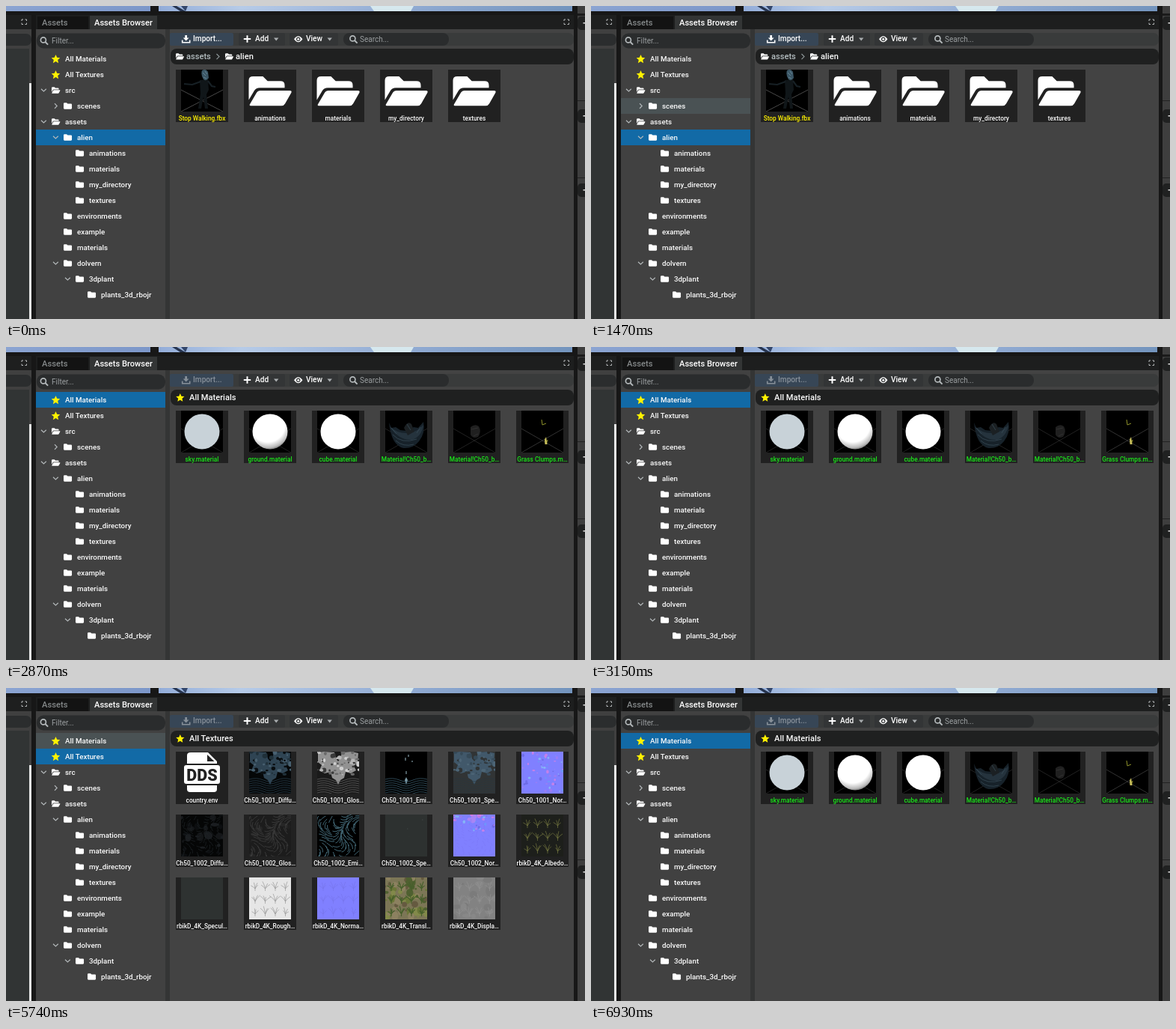
An HTML page for the animation above (8.05 s loop, 774 by 418 pixels).

```html
<!DOCTYPE html>
<html lang="en">
<head>
<meta charset="utf-8">
<title>Assets Browser</title>
<style>
html, body { margin: 0; width: 100%; height: 100%; overflow: hidden; background: #171717; }
#stage { display: block; width: 774px; height: 418px; font-family: Roboto, sans-serif; font-weight: 500; }
.anim { animation: 8050ms step-end infinite; }
#picked { animation-name: picked; }
#hover { animation-name: hover; }
#import { animation-name: import; }
#alien { animation-name: alien; }
#materials { animation-name: materials; }
#textures { animation-name: textures; }

@keyframes picked {
  0% { transform: translateY(105px); }
  34.782% { transform: translateY(0); }
  55.651% { transform: translateY(21px); }
  81.738%, 100% { transform: translateY(0); }
}
@keyframes hover {
  0% { visibility: hidden; }
  12.173% { visibility: visible; transform: translateY(63px); }
  15.651% { visibility: visible; transform: translateY(42px); }
  18.26% { visibility: visible; transform: translateY(63px); }
  22.608% { visibility: visible; transform: translateY(21px); }
  29.565% { visibility: visible; transform: translateY(0); }
  34.782% { visibility: hidden; }
  48.695% { visibility: visible; transform: translateY(21px); }
  55.651% { visibility: hidden; }
  71.304% { visibility: visible; transform: translateY(0); }
  81.738%, 100% { visibility: hidden; }
}
@keyframes import {
  0% { opacity: 1; }
  35.652%, 100% { opacity: .4; }
}
@keyframes alien {
  0% { visibility: visible; }
  35.652%, 100% { visibility: hidden; }
}
@keyframes materials {
  0% { visibility: hidden; }
  35.652% { visibility: visible; }
  56.521% { visibility: hidden; }
  82.608%, 100% { visibility: visible; }
}
@keyframes textures {
  0% { visibility: hidden; }
  56.521% { visibility: visible; }
  82.608%, 100% { visibility: hidden; }
}
</style>
</head>
<body>
<svg id="stage" viewBox="0 0 774 418"></svg>
<script>
const rect = (x, y, w, h, fill, r = 0) =>
  `<rect x="${x}" y="${y}" width="${w}" height="${h}" rx="${r}" fill="${fill}"/>`;
const path = (d, fill) => `<path d="${d}" fill="${fill}"/>`;
const line = (d, color, w = 1) => `<path d="${d}" fill="none" stroke="${color}" stroke-width="${w}"/>`;
const text = (x, y, s, size, fill = '#fafafa', extra = '') =>
  `<text x="${x}" y="${y}" font-size="${size}" fill="${fill}" ${extra}>${s}</text>`;
const at = (x, y, s, scale = '1') => `<g transform="translate(${x} ${y}) scale(${scale})">${s}</g>`;
const group = (id, s) => `<g id="${id}" class="anim">${s}</g>`;

const HINT = 'font-weight="400"';

// Icons
const folder = path('M0 1.2Q0 0 1.2 0H4.2L5.6 1.4H10.2Q11.4 1.4 11.4 2.6V7.6Q11.4 8.8 10.2 8.8H1.2Q0 8.8 0 7.6Z', '#fff');
const openFolder = path('M0 7V1.2Q0 0 1.2 0H3.9L5.2 1.4H8.7Q9.9 1.4 9.9 2.6V3.4H3Q2 3.4 1.5 4.3Z' +
  'M.3 8.3L2.2 4.8Q2.5 4.2 3.1 4.2H11.3Q12 4.2 11.7 4.9L10 8.1Q9.7 8.7 9 8.7H.5Q.1 8.7 .3 8.3Z', '#fff');
const star = path('M6 0L7.7 3.8 11.8 4.2 8.7 7 9.6 11.2 6 9 2.4 11.2 3.3 7 .2 4.2 4.3 3.8Z', '#fff200');
const lens = '<circle cx="4.4" cy="4.4" r="3.5" fill="none" stroke="#b4b9bb" stroke-width="1.7"/>' +
  line('M7 7L10.6 10.6', '#b4b9bb', 2);
const caret = path('M0 0H6.4L3.2 3.8Z', '#a9adaf');
const expand = line('M.5 2.5V.5H2.5M5 .5H7V2.5M7 5V7H5M2.5 7H.5V5', '#b6b9ba', 1);
const eye = path('M0 4Q5.7 -4 11.4 4Q5.7 12 0 4Z', '#fff') +
  '<circle cx="5.7" cy="4" r="2.7" fill="#2e3132"/><circle cx="5.7" cy="4" r="1.5" fill="#fff"/>';
const download = path('M4.3 0H7V3.6H9.6L5.65 7.6 1.7 3.6H4.3Z', '#fff') +
  line('M.7 6.6V9.8H10.7V6.6', '#fff', 1.6);

// Seeded drawing helpers for thumbnails, all in a 56 x 56 box
function random(seed) {
  return () => {
    seed = (seed * 16807) % 2147483647;
    return seed / 2147483647;
  };
}
const f = n => n.toFixed(1);
const fill = color => rect(0, 0, 56, 56, color);

function blobs(seed, count, colors, size, top = 0, height = 56) {
  const rnd = random(seed);
  let s = '';
  for (let i = 0; i < count; i++) {
    const x = rnd() * 56, y = top + rnd() * height, r = size * (.3 + rnd());
    s += `<ellipse cx="${f(x)}" cy="${f(y)}" rx="${f(r)}" ry="${f(r * (.4 + rnd()))}" fill="${colors[i % colors.length]}"/>`;
  }
  return s;
}

// Lines that sag away from the middle
function arches(color) {
  let d = '';
  for (let y = 36; y < 58; y += 3) {
    d += `M0 ${y + 1}Q10 ${y - 2} 19 ${y + 2}T37 ${y + 2}T56 ${y + 1}`;
  }
  return line(d, color, .7);
}

// Short strokes along a smooth swirling field
function flow(seed, color, width, steps) {
  const rnd = random(seed);
  let d = '';
  for (let y = 2; y < 56; y += 4) {
    for (let x = 2; x < 56; x += 9) {
      let px = x + rnd() * 5, py = y;
      d += `M${f(px)} ${f(py)}`;
      for (let i = 0; i < steps; i++) {
        const a = 1.5 * Math.sin(px / 11 + .6) + 1.1 * Math.cos(py / 10);
        px += 2 * Math.cos(a);
        py += 2 * Math.sin(a);
        d += `L${f(px)} ${f(py)}`;
      }
    }
  }
  return line(d, color, width);
}

function plants(seed, color, width = .7) {
  const rnd = random(seed);
  let d = '';
  for (let i = 0; i < 12; i++) {
    const x = 8 + (i % 4) * 13.5, y = 15 + Math.floor(i / 4) * 17;
    for (let k = 0; k < 4; k++) {
      const a = (k - 1.5) * .5 + (rnd() - .5) * .4, len = 5 + rnd() * 6;
      const dx = Math.sin(a) * len, dy = -Math.cos(a) * len;
      d += `M${f(x)} ${y}Q${f(x + dx * .35)} ${f(y + dy * .6)} ${f(x + dx)} ${f(y + dy)}`;
    }
    d += `M${f(x)} ${y}v3`;
  }
  return line(d, color, width);
}

const skin = (color, spots) =>
  path('M1 1L9 0 23 1 25 9 28 13 31 9 33 1 46 0 55 2 54 15 49 19 52 25 45 29 38 27 36 35 31 38 28 44 25 38 20 35 18 27 10 29 3 25 6 18 1 14Z', color) +
  blobs(11, 60, spots, 2.3, 0, 31);
const floor = line('M0 24L56 56M56 24L0 56', '#383838', .6);

const figure = fill('#000') + line('M0 27L56 56M56 27L0 56', '#777', .6) +
  path('M25 14L36 13 37 27 34 33 36 52 32 52 30 36 27 52 23 52 26 32Z', '#101619') +
  line('M26 16L15 20 4 19M36 15L41 22 46 23', '#172025', 2.2) +
  path('M28 1Q33 -2 36 3L37 11Q34 16 30 13Q26 7 28 1Z', '#3b5665') +
  line('M29 4L33 8M32 2L35 6M30 10L34 12', '#6e91a4', .8);

const ball = color => fill('#000') + floor + `<circle cx="28" cy="28" r="23.5" fill="${color}"/>`;

const bowl = fill('#000') + floor +
  path('M5 16L8 23 14 22 20 26 29 27 38 22 44 23 51 15Q54 30 45 41Q37 51 24 50Q8 46 5 16Z', '#17222a') +
  path('M6 21Q15 30 28 30Q42 30 51 19Q49 34 36 39Q18 40 6 21Z', '#25333d') +
  path('M25 23Q30 13 35 18L39 28 30 33Z', '#1b2023') +
  line('M10 32Q22 45 42 38M14 40Q24 49 38 45M29 18L34 26M8 23L15 31M47 22L42 30', '#3b4f5b', .7);
const scrap = fill('#000') + floor +
  path('M23 22Q29 17 34 21Q38 28 33 35Q26 38 23 32Z', '#202020') +
  line('M24 25L33 23M27 34L33 31', '#343434', .9);
const grass = fill('#000') + line('M0 24L56 56M56 24L0 56', '#555', .6) +
  line('M28 19L27 12M28 19L33 17M33 45L32 37M33 45L35 39', '#92962c', 1) +
  path('M31 39L33 35 34.5 45 31.5 45Z', '#c9c05b');

const fileIcon = path('M13 1H36L48 13V50Q48 54 44 54H12Q8 54 8 50V5Q8 1 13 1Z', '#fff') +
  path('M35 4V13H44.5Z', '#222') + rect(2, 16, 52, 29, '#222', 3) + rect(4, 18, 48, 25, '#fff', 3) +
  text(28, 38.5, 'DDS', 21.5, '#222', 'font-weight="900" text-anchor="middle"');

const normal = (seed, count, top, height) => fill('#8080ff') +
  blobs(seed, count, ['#9a7df5', '#6f93fb', '#c481ea', '#6d6be6', '#86b4f6'], 1.6, top, height);

// Asset tiles
const tile = (i, thumb, label, color) => {
  const x = 227 + (i % 6) * 91, y = 85 + Math.floor(i / 6) * 84;
  return rect(x, y, 70, 70, '#212121') +
    `<svg x="${x + 7}" y="${y}" width="56" height="56">${thumb}</svg>` +
    text(x + 35, y + 68, label, 8.3, color, 'text-anchor="middle"');
};
const folderTile = (i, label) =>
  tile(i, '', label) + at(324.5 + i * 91 - 91, 94, openFolder, '4.85 4.5');

const crumbStar = label => at(227, 62, star, '.97') + text(245, 71, label, 11.1);
const crumb = at(227, 63.2, openFolder, '.94') + text(241, 71, 'assets', 11.1, '#b5bec1') +
  line('M281.5 64L285 67.6 281.5 71.2', '#8c9496', 1.2) +
  at(293, 63.2, openFolder, '.94') + text(307, 71, 'alien', 11.1);

const alienView = crumb + tile(0, figure, 'Stop Walking.fbx', '#fff200') +
  ['animations', 'materials', 'my_directory', 'textures'].map((s, i) => folderTile(i + 1, s)).join('');

const materialsView = crumbStar('All Materials') + [
  [ball('#c8d2d8'), 'sky.material'], [ball('url(#shade)'), 'ground.material'],
  [ball('#fff'), 'cube.material'], [bowl, 'Material!Ch50_b…'],
  [scrap, 'Material!Ch50_b…'], [grass, 'Grass Clumps.m…']
].map(([pic, s], i) => tile(i, pic, s, '#1ae81a')).join('');

const texturesView = crumbStar('All Textures') + [
  [fileIcon, 'country.env'],
  [fill('#050708') + skin('#2f4453', ['#203039', '#486070', '#090d10']) + arches('#2c4351'), 'Ch50_1001_Diffu…'],
  [fill('#1a1a1a') + skin('#929292', ['#b8b8b8', '#6a6a6a', '#d0d0d0', '#3a3a3a']) + arches('#666'), 'Ch50_1001_Glos…'],
  [fill('#000') + line('M27 8V12M31 4V7M36 12V14M28 26V30', '#9ab9c4', 1) +
    path('M26 38L28 34 30 38 28 44Z', '#7c9aa6') + arches('#3f6576'), 'Ch50_1001_Emi…'],
  [fill('#313435') + skin('#41586a', ['#364a58', '#4d6576', '#303435']) + arches('#29373f'), 'Ch50_1001_Spe…'],
  [normal(23, 60, 0, 54), 'Ch50_1001_Nor…'],
  [fill('#050606') + blobs(31, 26, ['#141618', '#1a1d20', '#0c0e10'], 4.5) +
    flow(8, '#1f2427', .7, 3), 'Ch50_1002_Diffu…'],
  [fill('#1c1c1c') + blobs(31, 16, ['#262626', '#202020'], 4.5) + flow(8, '#454545', .7, 5), 'Ch50_1002_Glos…'],
  [fill('#000') + flow(8, '#568697', .8, 5), 'Ch50_1002_Emi…'],
  [fill('#2d3130') + blobs(44, 5, ['#3a3f3e'], .7), 'Ch50_1002_Spe…'],
  [normal(57, 32, 0, 22) + blobs(61, 9, ['#cf7be4', '#a985f5'], 3, 0, 8) +
    flow(4, '#7b76f4', .5, 2), 'Ch50_1002_Nor…'],
  [fill('#1d1f1b') + plants(71, '#74783f'), 'rbikD_4K_Albedo…'],
  [fill('#2e3231'), 'rbikD_4K_Specul…'],
  [fill('#e6e6e6') + plants(71, '#999'), 'rbikD_4K_Rough…'],
  [fill('#8080ff') + plants(71, '#7674ea', .6), 'rbikD_4K_Norma…'],
  [fill('#7c7656') + blobs(83, 70, ['#6a7638', '#8c8160', '#4f6030', '#82894a', '#655a40'], 4) +
    plants(71, '#465f2b', 1.2), 'rbikD_4K_Transl…'],
  [fill('#828282') + blobs(91, 20, ['#7b7b7b', '#888'], 5) + plants(71, '#929292'), 'rbikD_4K_Displa…']
].map(([pic, s], i) => tile(i, pic, s)).join('');

// Tree rows: depth, label, arrow (v open, > closed), open icon
const rows = [
  [0, 'All Materials'], [0, 'All Textures'], [0, 'src', 'v', 1], [1, 'scenes', '>'],
  [0, 'assets', 'v', 1], [1, 'alien', 'v'], [2, 'animations'], [2, 'materials'],
  [2, 'my_directory'], [2, 'textures'], [1, 'environments'], [1, 'example'],
  [1, 'materials'], [1, 'dolvern', 'v'], [2, '3dplant', 'v'], [3, 'plants_3d_rbojr']
];
const arrows = { v: 'M0 2.2L3.4 5.4 6.8 2.2', '>': 'M2 .5L5.2 3.9 2 7.3' };
const tree = rows.map(([depth, label, arrow, open], i) => {
  const x = 16 * depth, y = 60 + 21 * i;
  const icon = i < 2 ? at(60.5, y + 5, star) : at(61 + x, y + 6.2, open ? openFolder : folder, '.97');
  return icon + text(79 + x, y + 14, label, 9.8) +
    (arrow ? at(47 + x, y + 6.6, line(arrows[arrow], '#b3b8ba', 1.2)) : '');
}).join('');

const viewport = rect(0, 0, 193, 7, 'url(#sky)') + rect(204, 0, 553, 7, 'url(#sky2)') +
  path('M222 0H228L240 7H233Z', '#26344f') + path('M234 0H243L240 7Z', '#33466a') +
  path('M487 0H545L541 7H492Z', '#d6e8ee');

const sidePanels = rect(0, 12, 34, 19, '#1e1f1f') + at(20.5, 17.5, expand) +
  rect(0, 31, 34, 387, '#404040') + rect(-10, 37, 44, 16, '#2b2d2e', 7) +
  rect(0, 57, 31, 361, '#313434') + rect(31, 103, 3, 315, '#e9e9e9') +
  rect(764, 0, 10, 418, '#3e3e3e') + rect(764, 10, 10, 3, '#1b1b1b') +
  [14, 138, 237].map(y => rect(764, y, 20, 18, '#202121', 5) +
    rect(771.5, y + 8, 3, 1.5, '#ddd')).join('') +
  rect(764, 126, 10, 1, '#222') + rect(764, 229, 10, 1, '#222');

const header = rect(40, 12, 719, 19, '#1d1e1e') + rect(42, 14, 68, 17, '#131313') +
  rect(112, 13, 90, 18, '#333535') +
  text(48, 26, 'Assets', 11.2, '#85898a') + text(118, 26, 'Assets Browser', 11.1, '#fff') +
  at(745.5, 17.5, expand);

const toolbar = rect(219, 36, 540, 17, '#393b3b', 7) + rect(219, 36, 85, 17, '#374656', 2) +
  group('import', at(235, 39, download) + text(250, 47.3, 'Import...', 10.1, '#fff')) +
  rect(311, 36, 62, 17, '#333536', 2) + line('M322.5 39.3V48.7M317.8 44H327.2', '#fff', 2) +
  text(333, 47.3, 'Add', 10.1, '#fff') + at(358, 42.6, caret) +
  rect(379, 36, 65, 17, '#333536', 2) + at(385, 40.2, eye) +
  text(401, 47.3, 'View', 10.1, '#fff') + at(429.5, 42.6, caret) +
  rect(451, 36, 141, 17, '#2a2c2d', 8) + at(459, 39, lens) + text(473, 47.8, 'Search...', 10, '#9a9ea0', HINT);

const defs = `<defs>
  <linearGradient id="sky"><stop stop-color="#8ba4d2"/><stop offset="1" stop-color="#7c97c9"/></linearGradient>
  <linearGradient id="sky2"><stop stop-color="#93add9"/><stop offset=".2" stop-color="#b6cbe8"/>
    <stop offset=".6" stop-color="#91abd3"/><stop offset="1" stop-color="#7394bd"/></linearGradient>
  <radialGradient id="shade" cx=".43" cy=".3" r=".75"><stop offset=".66" stop-color="#fff"/>
    <stop offset=".87" stop-color="#bbb"/><stop offset="1" stop-color="#555"/></radialGradient>
</defs>`;

document.getElementById('stage').innerHTML = defs + rect(0, 0, 774, 418, '#171717') +
  viewport + sidePanels + header +
  rect(40, 31, 719, 387, '#434343') + rect(40, 31, 173, 387, '#414141') + rect(213, 31, 6, 387, '#343535') +
  rect(41, 36.5, 172, 20, '#2a2c2d', 9) + at(45.5, 41, lens) + text(61, 50, 'Filter...', 10, '#9a9ea0', HINT) +
  group('hover', rect(40, 60, 173, 21, '#4a5254')) +
  group('picked', rect(40, 60, 173, 21, '#126aa6')) +
  tree + toolbar + rect(220, 57, 539, 21, '#1f2020', 8) +
  group('alien', alienView) + group('materials', materialsView) + group('textures', texturesView);
</script>
</body>
</html>
```
